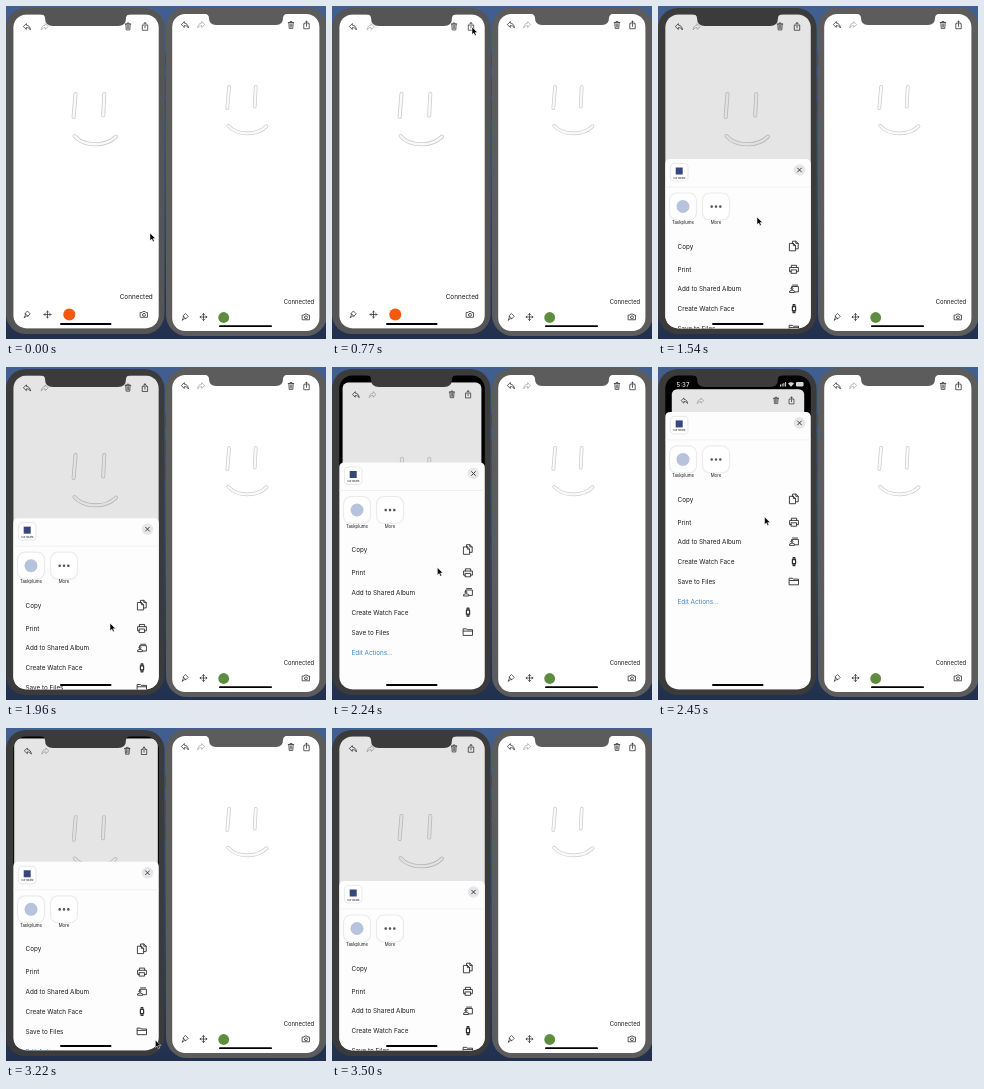
These frames come from a looping animation (320 px wide and 333 px high, 3.57 s). An HTML page:

```html
<!DOCTYPE html>
<html lang="en">
<head>
<meta charset="utf-8">
<title>Shared drawing</title>
<style>
  html, body { margin: 0; width: 100%; height: 100%; overflow: hidden; background: #22304d; }
  svg { display: block; width: 320px; height: 333px; }
  text { font-family: Inter, "Liberation Sans", sans-serif; fill: #1c1c1c; }
  .icon { fill: none; stroke: #303030; stroke-width: .9; stroke-linecap: round; stroke-linejoin: round; }
  .faded { stroke: #aaa; }
  .list { font-size: 6.35px; }
  .label { font-size: 4.3px; text-anchor: middle; }
  .tile { fill: #fff; stroke: #ebebeb; stroke-width: 1.2; }
</style>
</head>
<body>
<svg viewBox="0 0 320 333">
  <defs>
    <linearGradient id="desk" x2="0" y2="1">
      <stop stop-color="#415f90"/><stop offset=".5" stop-color="#344d75"/><stop offset="1" stop-color="#22304d"/>
    </linearGradient>
    <clipPath id="leftScreen"><rect x="7.3" y="8.4" width="145.5" height="314" rx="13"/></clipPath>

    <g id="undo"><path transform="scale(.85)" d="M-4-.8L-.8-4V-2.2C2-2 3.8 0 4 3.4C3 1.5 1.5.7-.8.7V2.4Z"/></g>
    <g id="trash"><path transform="scale(.82)" d="M-3.4-3H3.4M-1.2-3V-4.3H1.2V-3M-2.7-3L-2.2 4.2H2.2L2.7-3M-.9-1.4V2.6M.9-1.4V2.6"/></g>
    <g id="share"><path transform="scale(.85)" d="M-1.5-1.6H-3.2V4.4H3.2V-1.6H1.5M0 1.6V-4.6M-1.8-2.8L0-4.6L1.8-2.8"/></g>
    <g id="pen"><path transform="scale(.85)" d="M.8-3.8L3.8-.8L1 2H-.8L-3.4 4L-2 .8V-1ZM-2-1L1 2"/></g>
    <g id="move"><path transform="scale(.85)" d="M-4 0H4M0-4V4M-2.8-1.2L-4 0L-2.8 1.2M2.8-1.2L4 0L2.8 1.2M-1.2-2.8L0-4L1.2-2.8M-1.2 2.8L0 4L1.2 2.8"/></g>
    <g id="camera"><path transform="scale(.87)" d="M-4-2.2H-2.2L-1.4-3.4H1.4L2.2-2.2H4V3.2H-4ZM-1.7.4A1.7 1.7 0 1 0 1.7.4A1.7 1.7 0 1 0-1.7.4"/></g>
    <path id="copy" d="M-1.5-2.4V-4.8H1.8L4.2-2.6V2.8H1.8M1.8-4.8V-2.6H4.2M-4.2-2.6H-.6L1.6-.4V4.8H-4.2ZM-.6-2.6V-.4H1.6"/>
    <path id="print" d="M-2.6-1.8V-4H2.6V-1.8M-2.6 2.4H-4.4V-1.8H4.4V2.4H2.6M-2.6.6H2.6V4H-2.6Z"/>
    <path id="album" d="M-2.4-1.2V-2.2H4.4V3.2H1.4M-1.4-3.6H3.6M-4.4 3.4V2.4Q-2 .4.6 2.4V3.4ZM-3-.2A1 1 0 1 0-1-.2A1 1 0 1 0-3-.2"/>
    <path id="watch" d="M-1.6-2H1.6V2H-1.6ZM-.9-2.4V-4H.9V-2.4M-.9 2.4V4H.9V2.4" stroke-width="1.2"/>
    <path id="folder" d="M-4.5-3.2H-1.6L-.8-2.3H4.5V3.4H-4.5ZM-4.5-.9H4.5"/>

    <path id="strokes" d="M69.5 88L67.6 111M98.3 88L97.2 109.5M68.5 130C78 141 100 141 110 130.5"/>
    <g id="face" fill="none" stroke-linecap="round">
      <use href="#strokes" stroke="#ccc" stroke-width="4"/>
      <use href="#strokes" stroke="#fafafa" stroke-width="2.4"/>
    </g>
  </defs>

  <rect width="320" height="333" fill="url(#desk)"/>

  <!-- right phone -->
  <g fill="#5c5c5c">
    <path d="M159 47h2v13h-2zM159 72h2v18h-2zM159 94h2v18h-2z" fill="#4c4c4c"/>
    <rect x="160" y="1" width="161" height="329" rx="21"/>
    <rect x="166.2" y="8" width="147.2" height="317" rx="13" fill="#fff"/>
    <path d="M198 7.500Q203 8 203 12Q203 19 210 19H270Q277 19 277 12Q277 8 282 7.500Z"/>
  </g>
  <use href="#face" transform="translate(158.8 -.6) scale(.925)"/>
  <g class="icon">
    <use href="#undo" x="179" y="19"/>
    <use href="#undo" class="faded" transform="translate(195 19) scale(-1 1)"/>
    <use href="#trash" x="285" y="19"/>
    <use href="#share" x="300.5" y="19"/>
    <use href="#pen" x="179" y="311"/>
    <use href="#move" x="197.5" y="311"/>
    <use href="#camera" x="300" y="311"/>
  </g>
  <circle cx="217.7" cy="311.5" r="5.4" fill="#5f8d3f"/>
  <text x="277.7" y="297.6" font-size="5.9">Connected</text>
  <rect x="213" y="319.2" width="53" height="1.9" rx="1" fill="#000"/>

  <!-- left phone -->
  <rect class="bezel" x="0" y="2" width="158.5" height="326" rx="20"/>
  <g clip-path="url(#leftScreen)">
    <rect x="7" y="8" width="146" height="315" fill="#000"/>
    <g id="app">
      <rect x="7" y="8" width="146" height="315" rx="6" fill="#fff"/>
      <use href="#face"/>
      <g class="icon">
        <use href="#undo" x="21" y="21"/>
        <use href="#undo" class="faded" transform="translate(38.5 21) scale(-1 1)"/>
        <use href="#trash" x="122" y="20.5"/>
        <use href="#share" x="139" y="20.5"/>
        <use href="#pen" x="21" y="308.5"/>
        <use href="#move" x="41.5" y="308.5"/>
        <use href="#camera" x="138" y="308.5"/>
      </g>
      <circle cx="63.3" cy="308.5" r="6" fill="#f4590f"/>
      <text x="113.7" y="293" font-size="6.4">Connected</text>
      <rect id="dim" x="7" y="8" width="146" height="315" rx="6"/>
    </g>
    <g id="status" fill="#fff">
      <text x="18.5" y="19.5" font-size="6" font-weight="600" style="fill:#fff">5:37</text>
      <path d="M122 17.5h1v2h-1zM123.7 16.8h1v2.7h-1zM125.4 15.9h1v3.6h-1zM127.1 15h1v4.5h-1zM130 16.5Q133 13.8 136 16.5L133 19.7Z"/>
      <rect x="138" y="15" width="7.5" height="4.5" rx="1.2"/>
    </g>
    <g id="sheet">
      <rect x="7" width="146" height="330" rx="5" fill="#fdfdfd"/>
      <path d="M7 28H153" stroke="#eee" stroke-width=".8"/>
      <rect class="tile" x="12.5" y="4.5" width="17.5" height="17.5" rx="4"/>
      <rect x="17.7" y="8.5" width="7" height="7" fill="#35477c"/>
      <text class="label" x="21.2" y="19.5" style="font-size:2.6px">Our Board</text>
      <circle cx="141.5" cy="11" r="5.8" fill="#e7e7ea"/>
      <path class="icon" d="M139.6 9.1L143.4 12.900M143.4 9.1L139.6 12.900"/>
      <rect class="tile" x="11.5" y="34" width="27" height="27" rx="7.5"/>
      <circle cx="25" cy="47.5" r="6.5" fill="#b7c3dc"/>
      <rect class="tile" x="44.5" y="34" width="27" height="27" rx="7.5"/>
      <path d="M53.700 47.6h.01M58 47.6h.01M62.300 47.6h.01" stroke="#555" stroke-width="2.6" stroke-linecap="round"/>
      <text class="label" x="25" y="65.3">Taskplume</text>
      <text class="label" x="58" y="65.3">More</text>
      <g class="list">
        <text x="19.5" y="89.6">Copy</text>
        <text x="19.5" y="112.6">Print</text>
        <text x="19.5" y="132">Add to Shared Album</text>
        <text x="19.5" y="152">Create Watch Face</text>
        <text x="19.5" y="172">Save to Files</text>
        <text x="19.5" y="192.5" style="fill:#3f87c4">Edit Actions...</text>
      </g>
      <g class="icon">
        <use href="#copy" x="136" y="87"/>
        <use href="#print" x="136" y="110.3"/>
        <use href="#album" x="136" y="129.7"/>
        <use href="#watch" x="136" y="149.7"/>
        <use href="#folder" x="136" y="169.5"/>
      </g>
    </g>
  </g>
  <path class="bezel" d="M34 8Q39 8.5 39 12Q39 20 47 20H112Q120 20 120 12Q120 8.5 125 8Z"/>
  <rect x="54" y="317" width="51.5" height="2" rx="1" fill="#000"/>

  <path id="cursor" d="M0 0V7.6L1.8 6L3 8.7L4.3 8.1L3.1 5.5H5.5Z" fill="#000" stroke="#fff" stroke-width=".5"/>
</svg>
<script>
  const LOOP = 3570, STEP = 70;
  const OPEN = 153, CLICK = 840, EXIT = 3430;

  // [time, value, ...]
  const sheetKeys = [[910, 326], [1260, OPEN], [1910, OPEN], [2600, 30], [2800, 30], [3360, OPEN]];
  const cursorKeys = [
    [0, 144, 227], [490, 123, 36], [770, 140, 21], [1190, 140, 21], [1540, 99, 211],
    [1910, 104, 258], [2600, 107, 135], [2800, 108, 209], [3360, 157, 331]
  ];

  const $ = id => document.getElementById(id);
  const clamp = x => Math.min(1, Math.max(0, x));
  const ease = x => x * x * (3 - 2 * x);

  function sample(keys, t) {
    const next = keys.findIndex(key => key[0] > t);
    if (next < 0) return keys.at(-1).slice(1);
    if (next === 0) return keys[0].slice(1);
    const a = keys[next - 1], b = keys[next];
    const k = ease((t - a[0]) / (b[0] - a[0]));
    return a.slice(1).map((v, i) => v + (b[i + 1] - v) * k);
  }

  function draw(t) {
    const [top] = sample(sheetKeys, t);
    const [x, y] = sample(cursorKeys, t);
    const lift = Math.max(0, (OPEN - top) / 58);   // how far the app card has sunk back
    const scale = 1 - .05 * lift;

    $('sheet').setAttribute('transform', `translate(0 ${top})`);
    $('app').setAttribute('transform', `translate(${80 * (1 - scale)} ${8 * lift}) scale(${scale})`);
    $('dim').setAttribute('opacity', .1 * clamp((326 - top) / 173));
    $('status').setAttribute('opacity', clamp((70 - top) / 30));
    $('cursor').setAttribute('transform', `translate(${x} ${y})`);
    $('cursor').setAttribute('visibility', t < EXIT ? 'visible' : 'hidden');
    for (const part of document.querySelectorAll('.bezel'))
      part.setAttribute('fill', t < CLICK ? '#555' : '#3b3b3b');
  }

  const start = performance.now();
  function tick() {
    const t = (performance.now() - start) % LOOP;
    draw(Math.floor(t / STEP) * STEP);
    requestAnimationFrame(tick);
  }
  tick();
</script>
</body>
</html>
```
